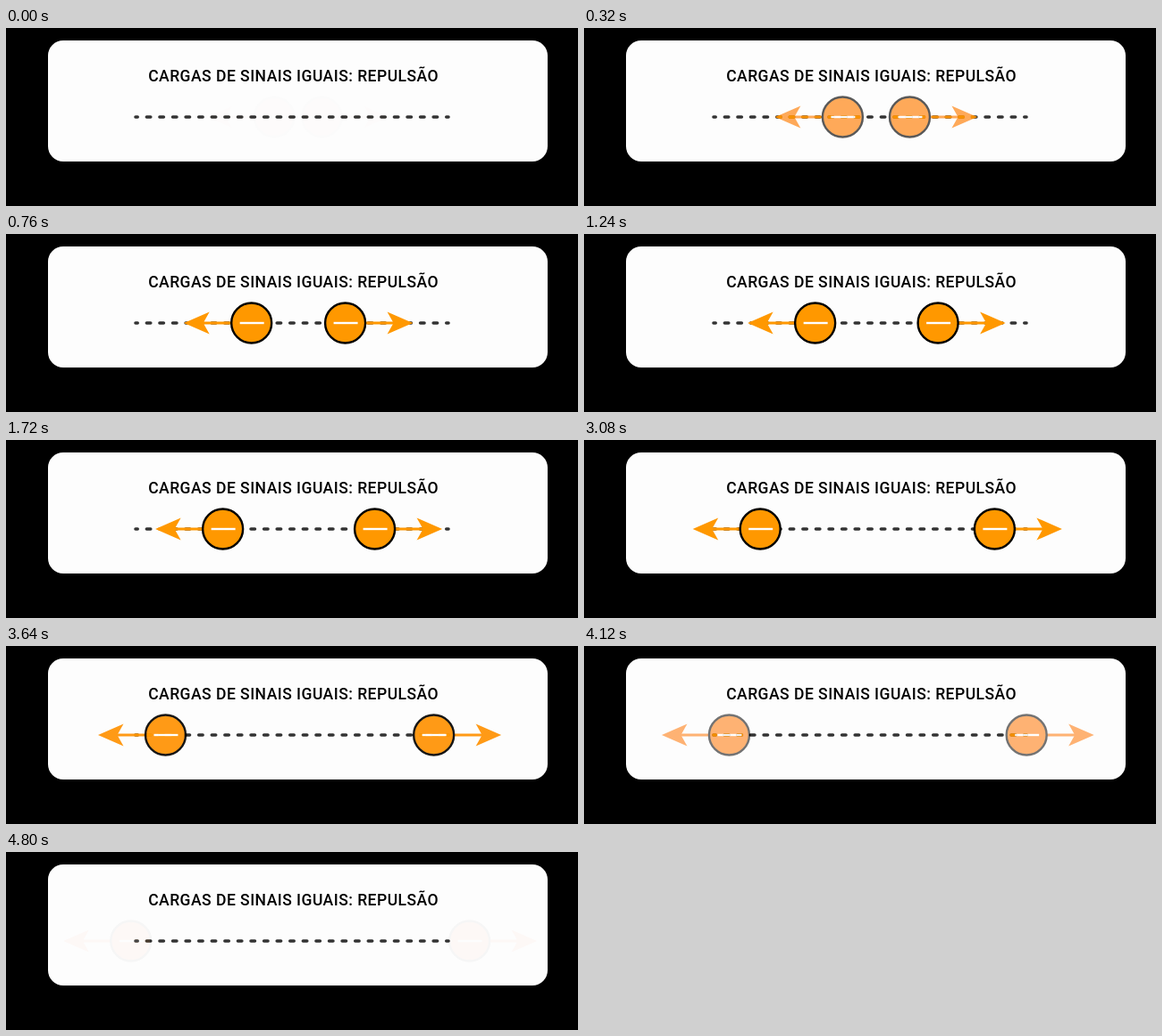
An HTML page for the animation above (4840 ms loop, 640 by 200 pixels).

```html
<!DOCTYPE html>
<html lang="pt">
<head>
<meta charset="utf-8">
<title>Cargas de sinais iguais</title>
<style>
  html, body { margin: 0; width: 100%; height: 100%; overflow: hidden; background: #000; }
  svg { display: block; width: 100vw; height: 100vh; }
  text { font: 500 17.5px Roboto, sans-serif; letter-spacing: .48px; }
  .dashes { stroke-width: 3.6; stroke-linecap: round; stroke-dasharray: 4.4 10.183; stroke-dashoffset: 2.2; }
</style>
</head>
<body>
<svg viewBox="0 0 640 200">
  <defs>
    <g id="arrow">
      <path d="M22 0H56" stroke="currentColor" stroke-width="2.8"/>
      <path d="M75.5 0L47 -12.5L54 0L47 12.5Z" fill="currentColor"/>
    </g>
    <g id="ball">
      <circle r="22.5" fill="currentColor" stroke="#000" stroke-width="2.4"/>
      <path d="M-13 0H14" stroke="#fff" stroke-width="2.4"/>
    </g>
    <g id="pair">
      <g id="left"><use href="#arrow" transform="scale(-1 1)"/><use href="#ball"/></g>
      <g id="right"><use href="#arrow"/><use href="#ball"/></g>
    </g>
    <mask id="onDashes" maskUnits="userSpaceOnUse" x="0" y="0" width="640" height="200">
      <path class="dashes" d="M145 100H495" stroke="#fff"/>
    </mask>
  </defs>
  <rect x="47" y="14" width="559" height="136" rx="17" fill="#fdfdfd"/>
  <text x="321.6" y="60" text-anchor="middle">CARGAS DE SINAIS IGUAIS: REPULSÃO</text>
  <path class="dashes" d="M145 100H495" stroke="#333"/>
  <use id="charges" href="#pair"/>
  <!-- the charges stay denser where they cross the dashes -->
  <g mask="url(#onDashes)"><use id="dense" href="#pair"/></g>
</svg>
<script>
  const LOOP = 4840, FADE_IN = 500, FADE_OUT = 1310;
  const el = id => document.getElementById(id);
  const left = el('left'), right = el('right'), charges = el('charges'), dense = el('dense');
  const place = (node, x) => node.setAttribute('transform', `translate(${x.toFixed(2)} 100)`);

  function draw(t) {
    place(left, 300.1 - 0.0334 * t);
    place(right, 353.4 + 0.0344 * t);
    const a = Math.min(1, t / FADE_IN, (LOOP - t) / FADE_OUT);
    charges.setAttribute('opacity', a);
    charges.setAttribute('color', `rgb(255, ${Math.round(152 - 80 * (1 - a))}, 0)`);
    dense.setAttribute('opacity', 1 - (1 - a) ** 2.5);
    dense.setAttribute('color', '#ff9800');
  }

  const start = performance.now();
  function tick() {
    draw((performance.now() - start) % LOOP);
    requestAnimationFrame(tick);
  }
  draw(0);
  requestAnimationFrame(tick);
</script>
</body>
</html>
```
